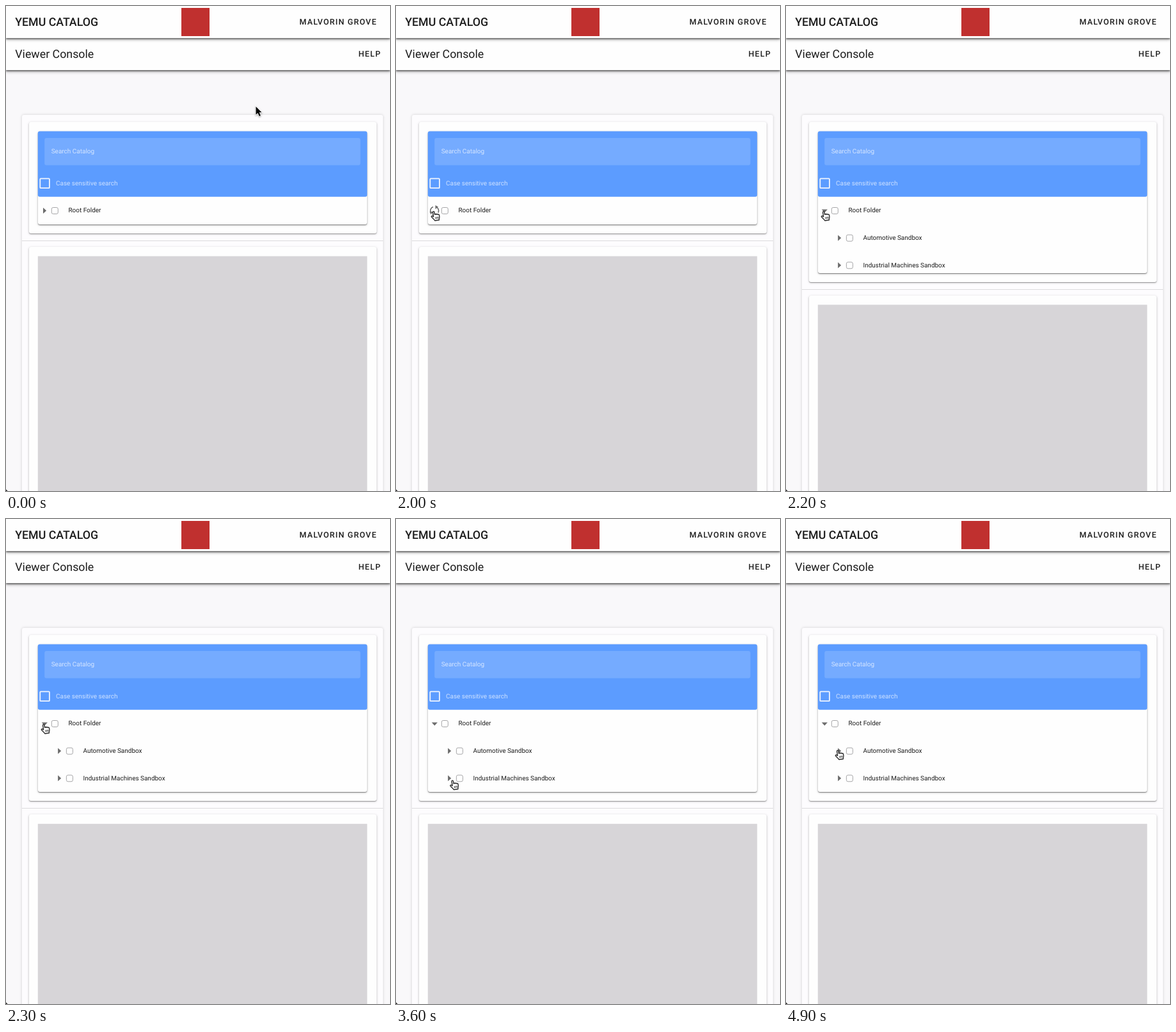
These frames come from a looping animation (600 by 757 pixels, 5000 ms). An HTML page:

```html
<!DOCTYPE html>
<html lang="en">
<head>
<meta charset="utf-8">
<title>Viewer Console</title>
<style>
html, body { margin: 0; width: 100%; height: 100%; overflow: hidden; background: #f9f8fa; }
#stage { position: relative; width: 600px; height: 757px; overflow: hidden; background: #f9f8fa; }
#stage div, #stage svg { position: absolute; }
text { font-family: Roboto, Arial, sans-serif; font-size: 9.98px; fill: #1c1c1c; text-rendering: geometricPrecision; white-space: pre; }
.bar { left: 0; width: 600px; height: 50px; background: #fefefe;
  box-shadow: 0 1.5px 2px rgba(0,0,0,.42), 0 2.5px 5px rgba(0,0,0,.3); }
.outer { left: 25px; top: 170px; width: 564px; height: 700px; border-radius: 3px; background: #fdfcfe;
  box-shadow: 0 0 4px rgba(0,0,0,.17); }
.card { left: 36px; width: 543px; border-radius: 3px; background: #fefefe;
  box-shadow: 0 1px 1.5px rgba(0,0,0,.38), 0 1px 4px rgba(0,0,0,.14); }
#panel { left: 50px; top: 196px; width: 514px; border-radius: 3px; background: #fefefe; overflow: hidden;
  box-shadow: 0 1px 1.5px rgba(0,0,0,.48), 0 1px 4px rgba(0,0,0,.16); }
#rule { left: 25px; width: 564px; height: 1px; background: #dcdbdd; }
#mark { left: 274px; top: 3px; width: 44px; height: 44px; background: #c0302f; }
.head { font-size: 17.8px; }
.strong { font-weight: 500; }
.button { font-size: 12.45px; font-weight: 500; letter-spacing: 1.2px; }
.pale { fill: rgba(255,255,255,.7); }
.box { fill: #fff; stroke: #a5a5a7; }
.tri { fill: #6c6c6c; }
#spin { fill: none; stroke: #666; stroke-width: 1.6; }
#arrow { filter: drop-shadow(0 1px 1px rgba(0,0,0,.35)); }
</style>
</head>
<body>
<div id="stage">
  <div class="outer"></div>
  <div class="card" id="top" style="top:181px"></div>
  <div id="panel">
    <svg id="tree" width="515" height="240" viewBox="50 196 515 240"></svg>
  </div>
  <div id="rule"></div>
  <div class="card" id="low" style="height:500px"></div>
  <svg width="600" height="757" viewBox="0 0 600 757">
    <rect x="49.8" y="195.4" width="514.5" height="102.3" rx="3" fill="#5c9cff"/>
    <rect x="60.2" y="206" width="493.5" height="42.5" rx="3" fill="#75abff"/>
    <rect id="view" x="49.8" width="514.5" height="500" fill="#d7d5d8"/>
  </svg>
  <div class="bar" style="top:50px"></div>
  <div class="bar" style="top:0"></div>
  <div id="mark"></div>
  <svg width="600" height="757" viewBox="0 0 600 757">
    <text class="head strong" x="14.2" y="31">YEMU CATALOG</text>
    <text class="button" x="458.5" y="29.3">MALVORIN GROVE</text>
    <text class="head" x="14.3" y="81">Viewer Console</text>
    <text class="button" x="550.8" y="79.3">HELP</text>
    <text class="pale" x="70.7" y="230">Search Catalog</text>
    <text class="pale" x="78" y="279.8">Case sensitive search</text>
    <rect x="53.3" y="269.4" width="14.6" height="14.8" rx="1" fill="none" stroke="#eef4ff" stroke-width="1.8"/>
    <path d="M0 754 Q.5 756.5 3 757 H0Z" fill="#000"/>
    <g id="arrow">
      <path d="M0 0V12.6L3 9.9L5.2 14.9L7.4 13.9L5.2 9.1L9 8.9Z" stroke="#fff" stroke-width="1.6" paint-order="stroke"/>
    </g>
    <g id="hand">
      <g transform="rotate(-9 7 8)" stroke="#2b2b2b" stroke-linejoin="round">
        <path d="M4.4 2.2C4.4 .4 6.9 .4 6.9 2.2V6C7.4 5.2 8.9 5.2 9.1 6.2C9.7 5.5 11 5.6 11.2 6.7C12 6.2 13.6 6.6 13.6 7.9V10.2C13.6 12 12.4 12.8 12.3 15.4H5.6C5.2 13.5 2.6 11 1.4 9C.7 7.8 2 7 3 7.8L4.4 9Z" fill="#fff" stroke-width="1.4"/>
        <path d="M7.4 10V13M9.3 10V13M11.2 10V13" fill="none" stroke-width=".9"/>
      </g>
    </g>
  </svg>
</div>
<script>
const LOOP = 5000, STEP = 100, ROW = 42.65, OPEN = 2000;
const $ = id => document.getElementById(id);

// time, x, y of the pointer
const path = [
  [400, 390.5, 157], [900, 14, 315], [1000, 48, 335], [1400, 52, 321],
  [1500, 52, 321], [1600, 54, 319.5], [2900, 54, 319.5], [3200, 70.5, 355],
  [3500, 84, 408.5], [3600, 83.5, 407], [3700, 83.5, 407], [3800, 82.7, 406.5],
  [4200, 82.7, 406.5], [4400, 70, 359.5], [4500, 70, 359.5], [4700, 75, 360.5],
  [4800, 75, 360.5], [4900, 76, 360]
];

const right = (x, y) => `M${x - 2.3} ${y - 4.6}L${x + 2.8} ${y}L${x - 2.3} ${y + 4.6}Z`;
const down = (x, y) => `M${x - 4.6} ${y - 2.2}H${x + 4.6}L${x} ${y + 2.8}Z`;

function row(label, i) {
  const x = i ? 83.4 : 60.3, y = 319.4 + i * ROW;
  return `<path class="tri" ${i ? "" : 'id="root"'} d="${right(x, y)}"/>
    <rect class="box" x="${x + 11}" y="${y - 4.9}" width="10" height="10" rx="2.4"/>
    <text x="${x + 37.1}" y="${y + 3}">${label}</text>`;
}

$("tree").innerHTML =
  ["Root Folder", "Automotive Sandbox", "Industrial Machines Sandbox"].map(row).join("") +
  `<g id="spin"><path d="M54.8 323A6.2 6.2 0 0 1 58 313.6M62 313.4A6.2 6.2 0 0 1 65.8 322.5M62.8 325A6.2 6.2 0 0 1 57 325"/>
   <path class="tri" stroke="none" d="M61.5 311V317L66 313.5ZM52.5 321H58L54.5 325.5Z"/></g>`;

function pointer(t) {
  const n = path.findIndex(k => k[0] >= t);
  if (n < 0) return path[path.length - 1].slice(1);
  if (n === 0) return path[0].slice(1);
  const a = path[n - 1], b = path[n];
  const p = (t - a[0]) / (b[0] - a[0]), e = p * p * (3 - 2 * p);
  return [a[1] + (b[1] - a[1]) * e, a[2] + (b[2] - a[2]) * e];
}

function draw(now) {
  const t = Math.floor((now % LOOP) / STEP) * STEP;
  const p = Math.min(1, Math.max(0, (t - OPEN) / 300));
  const grow = 2 * ROW * (1 - (1 - p) ** 2);

  $("panel").style.height = 144.7 + grow + "px";
  $("top").style.height = 174 + grow + "px";
  $("rule").style.top = 366 + grow + "px";
  $("low").style.top = 376 + grow + "px";
  $("view").setAttribute("y", 390.5 + grow);

  const busy = t === OPEN;
  $("spin").style.display = busy ? "" : "none";
  $("root").style.display = busy ? "none" : "";
  $("root").setAttribute("d", t > OPEN ? down(60.3, 319.8) : right(60.3, 319.4));

  const [x, y] = pointer(t), hand = t >= 1200;
  $("arrow").style.display = hand ? "none" : "";
  $("hand").style.display = hand ? "" : "none";
  $(hand ? "hand" : "arrow").setAttribute("transform", `translate(${x} ${y})`);
}

function tick() {
  draw(performance.now());
  requestAnimationFrame(tick);
}
tick();
</script>
</body>
</html>
```
